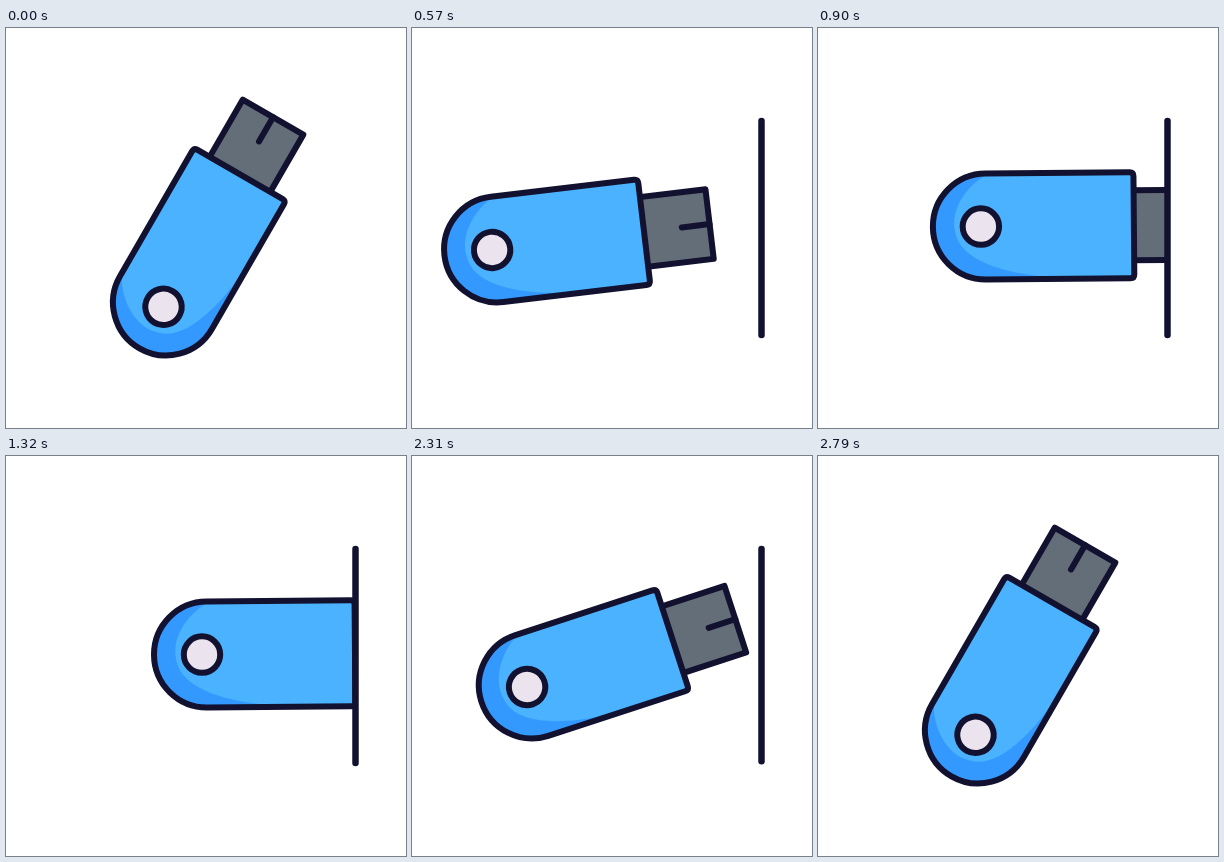
These frames come from a looping animation (400x400 px, 3.09 s). An HTML page:

```html
<!DOCTYPE html>
<html>
<head>
<meta charset="utf-8">
<style>
html, body { margin: 0; width: 100%; height: 100%; overflow: hidden; background: #fff; }
svg { display: block; width: 100vw; height: 100vh; }
.ink { stroke: #121230; stroke-width: 6; stroke-linecap: round; stroke-linejoin: round; }
</style>
</head>
<body>
<svg viewBox="0 0 400 400">
  <defs>
    <clipPath id="port"><path d="M0 0H349V400H0Z"/></clipPath>
    <path id="shell" d="M5 -53H149Q153 -53 153 -49V49Q153 53 149 53H5A53 53 0 0 1 5 -53Z"/>
  </defs>
  <g clip-path="url(#port)">
    <!-- local origin: centre of the keyring hole, plug pointing right -->
    <g id="stick">
      <path class="ink" fill="#646e78" d="M150 -35H219V35H150Z"/>
      <path class="ink" d="M219 0H191"/>
      <use href="#shell" fill="#3399ff"/>
      <path fill="#4bb2ff" d="M8 -53C-16 -40 -30 -16 -26 4C-22 36 30 51 96 53H149Q153 53 153 49V-49Q153 -53 149 -53Z"/>
      <use href="#shell" class="ink" fill="none"/>
      <circle class="ink" fill="#ebe4ef" r="18.2"/>
    </g>
  </g>
  <path id="wall" class="ink" style="stroke-width:6.5"/>
</svg>
<script>
const LOOP = 3090, STEP = 30, PIVOT = 85;
const stick = document.getElementById('stick');
const wall = document.getElementById('wall');

// Ease in and out from 0 to 1 between two times.
function ease(t, from, to, power = 2) {
  const u = Math.min(1, Math.max(0, (t - from) / (to - from)));
  return u < 0.5 ? (2 * u) ** power / 2 : 1 - (2 - 2 * u) ** power / 2;
}

function draw(now) {
  const t = Math.floor(now % LOOP / STEP) * STEP;

  // wind back, plug in, pull out too far, settle
  const x = 200 - 40 * ease(t, 0, 510) + 121 * ease(t, 387, 1255, 3)
    - 90 * ease(t, 1767, 2529, 4) + 9 * ease(t, 2430, 2790);
  const y = 205.2 + 7 * ease(t, 0, 500) - 14.4 * ease(t, 540, 840) + 7.4 * ease(t, 2180, 2340);
  const tilt = 60 - 59.5 * ease(t, 0, 740) + 64.5 * ease(t, 2122, 2632) - 5 * ease(t, 2632, 2790);
  stick.setAttribute('transform',
    `translate(${x} ${y}) rotate(${-tilt}) translate(${-PIVOT} 0)`);

  const length = 214 * (ease(t, 200, 540) - ease(t, 2290, 2600));
  wall.setAttribute('d', length > 0 ? `M349.5 93v${length}` : '');
}

const start = performance.now();
function tick() {
  draw(performance.now() - start);
  requestAnimationFrame(tick);
}
tick();
</script>
</body>
</html>
```
